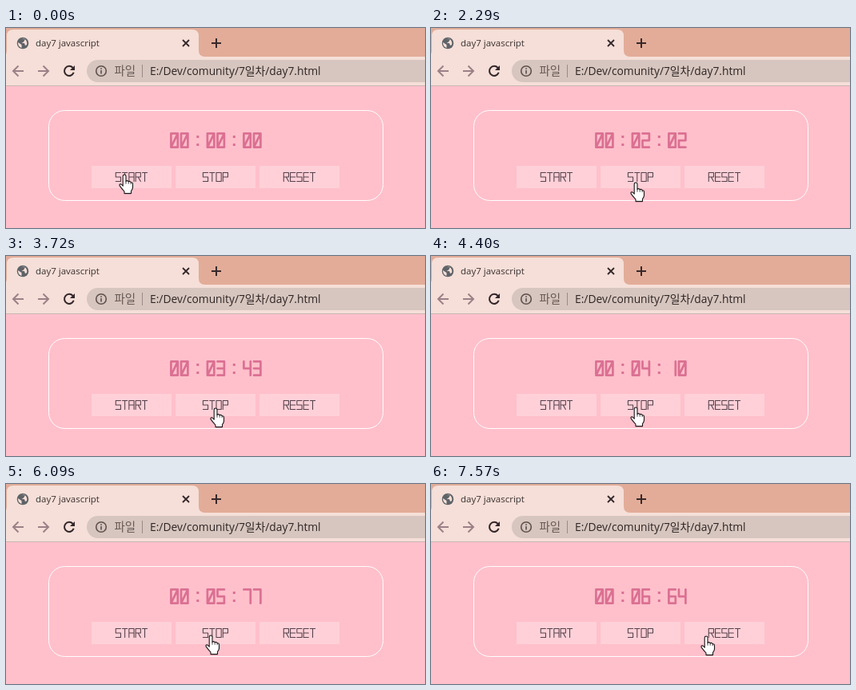
These frames come from a looping animation (524x251 px, 8 s). An HTML page with a canvas:

```html
<!DOCTYPE html>
<html lang="ko">
<head>
<meta charset="utf-8">
<title>day7 javascript</title>
<style>
  html, body { margin: 0; width: 100%; height: 100%; overflow: hidden; background: #ffc0cb; }
  canvas { display: block; }
</style>
</head>
<body>
<canvas id="stage" width="524" height="251" aria-label="Stopwatch with START, STOP and RESET buttons"></canvas>
<script>
const ctx = document.getElementById('stage').getContext('2d');
const LOOP = 8000;
const SANS = '"Open Sans", "Noto Sans CJK KR", "Noto Sans", sans-serif';

// The screen refreshes at a steady rate; the stopwatch gains a fixed amount per refresh.
const REFRESH = 67.67, PHASE = 55.3;
const GAIN = 6.692, LAG = 18.38, STOPPED_AT = 664;

const clamp = (v, lo, hi) => Math.min(hi, Math.max(lo, v));
const glide = (t, from, to) => {
  const p = clamp((t - from) / (to - from), 0, 1);
  return p * p * (3 - 2 * p);
};

function stopwatch(refreshes) {
  return Math.round(clamp(refreshes * GAIN - LAG, 0, STOPPED_AT));
}

function cursorAt(t) {
  const toStop = glide(t, 500, 930), toReset = glide(t, 7280, 7560);
  const nudge = glide(t, 3580, 3700), back = glide(t, 4100, 4320);
  return [
    142 + 108 * toStop + 6 * (nudge - back) + 88 * toReset,
    183 + 8 * toStop + 2 * glide(t, 1500, 1600) - 3 * nudge - back + toReset
  ];
}

// Display lettering: strokes through the points 0-8 of a 3 by 3 grid
const glyphs = {
  0: '02860 62', 1: '28', 2: '025368', 3: '0286 35', 4: '035 28',
  5: '203586', 6: '206853', 7: '028', 8: '02860 35', 9: '530286',
  S: '203586', T: '02 17', A: '6028 35', R: '60253 48', O: '02860', P: '60253', E: '2068 35'
};

function gridText(text, x, y, w, h, advance) {
  ctx.beginPath();
  [...text].forEach((ch, i) => {
    for (const stroke of glyphs[ch].split(' ')) {
      [...stroke].forEach((p, j) => {
        const px = x + i * advance + (p % 3) * w / 2;
        const py = y + Math.floor(p / 3) * h / 2;
        j ? ctx.lineTo(px, py) : ctx.moveTo(px, py);
      });
    }
  });
  ctx.stroke();
}

function pen(color, width, cap = 'butt') {
  ctx.strokeStyle = color;
  ctx.lineWidth = width;
  ctx.lineCap = cap;
  ctx.lineJoin = cap === 'round' ? 'round' : 'miter';
}

const line = d => ctx.stroke(new Path2D(d));

function rect(color, x, y, w, h) {
  ctx.fillStyle = color;
  ctx.fillRect(x, y, w, h);
}

function shape(color, d) {
  ctx.fillStyle = color;
  ctx.fill(new Path2D(d));
}

function circle(x, y, r) {
  ctx.beginPath();
  ctx.arc(x, y, r, 0, Math.PI * 2);
}

function label(text, x, y, size, color) {
  ctx.font = `${size}px ${SANS}`;
  ctx.fillStyle = color;
  ctx.fillText(text, x, y);
}

function drawTab() {
  rect('#e2ac98', 0, 0, 524, 36);
  shape('#f5dfd8', 'M-7 36 Q1 36 1 28 V10 Q1 2 9 2 H233 Q241 2 241 10 V28 Q241 36 249 36 Z');

  ctx.fillStyle = '#5f6368';
  circle(21, 19, 7.3);
  ctx.fill();
  shape('#f5dfd8', 'M15 18 L19.5 21 V25 Q14.5 23 15 18 Z M19 14 H24 L22 17.5 L19.5 19 H23 L24 22 L26 21 Q27 16 23 13.5 Z');
  label('day7 javascript', 37, 23, 11.5, '#3c3030');

  pen('#33262a', 1.8);
  line('M221 15 L229 23 M229 15 L221 23');
  pen('#38282a', 2);
  line('M257 19 H269 M263 13 V25');
}

function drawToolbar() {
  rect('#f5dfd8', 0, 36, 524, 36);
  rect('#c8b5b0', 0, 72, 524, 1);

  pen('#9c8088', 2);
  line('M22 54 H9.5 M15.5 47.5 L9 54 L15.5 60.5');
  line('M40 54 H52.5 M46.5 47.5 L53 54 L46.5 60.5');
  pen('#33262a', 2);
  line('M83.6 50 A6 6 0 1 0 84.7 55.8');
  shape('#33262a', 'M86 47 V53 H80 Z');

  ctx.fillStyle = '#d7c6bf';
  ctx.beginPath();
  ctx.roundRect(101, 40, 460, 28, 14);
  ctx.fill();
  pen('#5c4f4c', 1.6);
  circle(119, 54, 6.3);
  ctx.stroke();
  rect('#5c4f4c', 118.2, 53, 1.6, 4.5);
  rect('#5c4f4c', 118.2, 50.3, 1.6, 1.6);
  label('파일', 135.5, 59, 14.5, '#665854');
  rect('#9a8a85', 170, 46, 1, 16);
  label('E:/Dev/comunity/7일차/day7.html', 180, 59, 13.8, '#2e2524');
}

function drawTimer(count) {
  const parts = [0, Math.floor(count / 100), count % 100];
  pen('#db7093', 2.7, 'round');
  parts.forEach((n, i) =>
    gridText(String(n).padStart(2, '0'), 206.4 + i * 45.5, 132.4, 8.4, 17.3, 12.6));
  for (const x of [238.3, 283.8]) {
    rect('#db7093', x, 135, 3, 3);
    rect('#db7093', x, 145, 3, 3);
  }
}

function drawPage(count) {
  rect('#ffc0cb', 0, 73, 524, 178);
  pen('#ffffff', 1);
  ctx.beginPath();
  ctx.roundRect(53.5, 103.5, 418, 113, 20);
  ctx.stroke();
  drawTimer(count);
  ['START', 'STOP', 'RESET'].forEach((text, i) => {
    const x = 107 + 105 * i, advance = 8.3;
    rect('#ffd0d8', x, 173, 100, 28);
    pen('#54404a', 1.05, 'round');
    gridText(text, x + 51 - text.length * advance / 2, 181.5, 6.2, 11, advance);
  });
}

const hand = new Path2D('M5 15 V2.6 A1.9 1.9 0 0 1 8.8 2.6 V9 Q10.5 7.4 12 9.4 Q13.8 8.4 15 10.5 Q17.3 10 17.3 12.5 V17 Q17 19 15.3 21.2 V24.3 H6.8 V21.8 Q4 19 .9 14.6 Q.3 12.6 2.2 12.4 Q3.6 12.8 5 15 Z');

function drawCursor([x, y]) {
  ctx.save();
  ctx.translate(Math.round(x) - 0.8, Math.round(y) + 0.3);
  ctx.fillStyle = '#fff';
  ctx.fill(hand);
  pen('#1a1517', 1.1, 'round');
  ctx.stroke(hand);
  pen('#1a1517', 0.8, 'round');
  line('M8.8 9 V12 M12 9.6 V12 M15 10.6 V12.5');
  ctx.restore();
}

function render(now) {
  const refreshes = Math.floor((now % LOOP - PHASE) / REFRESH);
  drawTab();
  drawToolbar();
  drawPage(stopwatch(refreshes));
  drawCursor(cursorAt(PHASE + refreshes * REFRESH));
}

const start = performance.now();
function loop() {
  render(performance.now() - start);
  requestAnimationFrame(loop);
}
loop();
</script>
</body>
</html>
```
